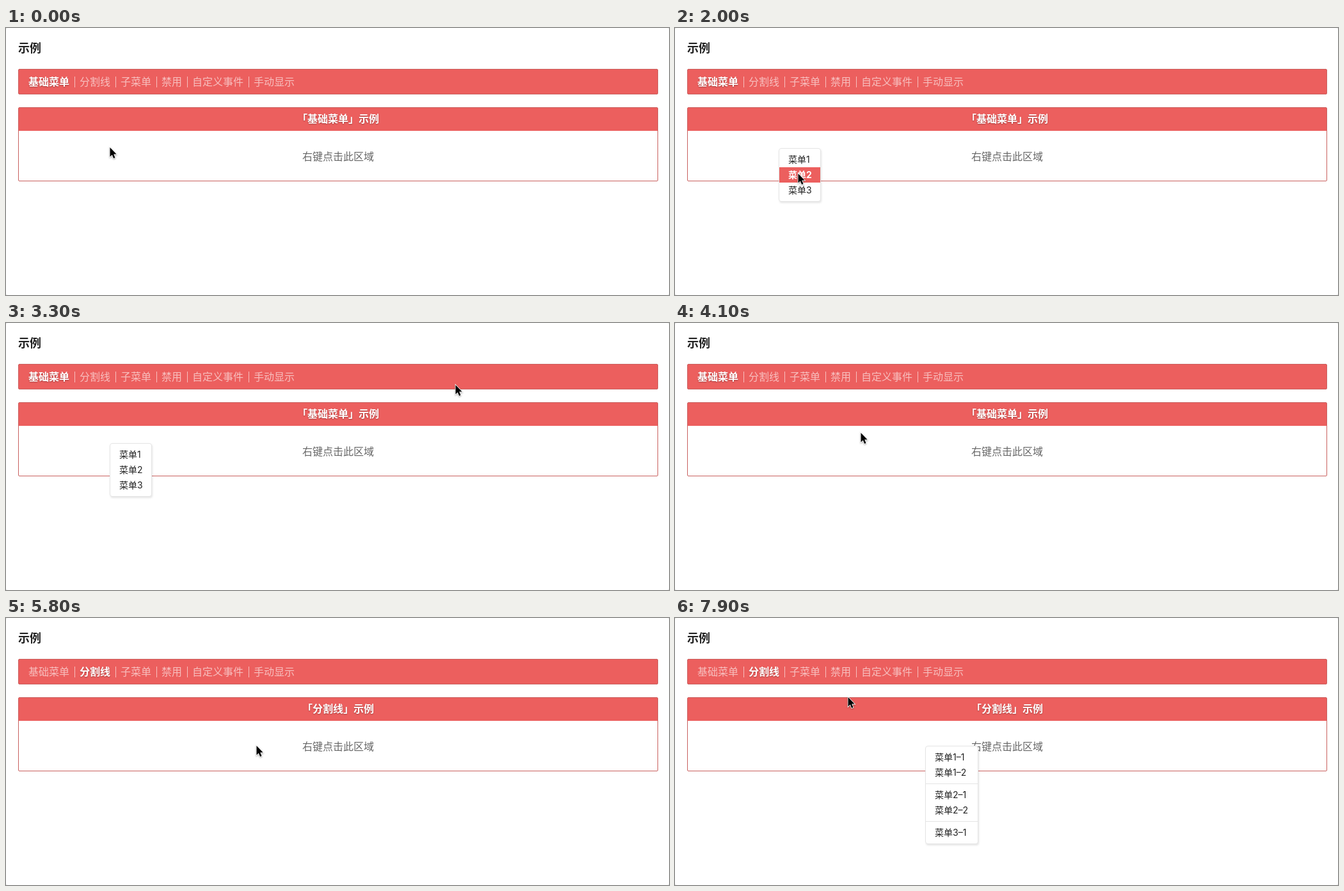
Animation of 1036 by 418 pixels, one loop 8 s. Source, as an HTML page:

```html
<!DOCTYPE html>
<html lang="zh-CN">
<head>
<meta charset="utf-8">
<title>右键菜单示例</title>
<style>
  :root { --red: #ec5f5e; --edge: #c9605f; --dim: rgba(255, 255, 255, .6); }
  * { box-sizing: border-box; }
  html, body { margin: 0; width: 100%; height: 100%; overflow: hidden; background: #e6e6e6; }
  body { font: 16px/24px Inter, "Noto Sans CJK SC", "Noto Sans CJK", sans-serif; color: #222; }
  #stage { position: absolute; left: 0; top: 0; width: 1036px; height: 418px; overflow: hidden; background: #fff; border-radius: 3px; }
  #stage div, #stage svg { position: absolute; white-space: nowrap; }

  #heading { left: 19px; top: 20px; font-size: 18px; font-weight: 700; }

  #nav, #panel { left: 19px; width: 1000px; border: 1px solid var(--edge); border-radius: 2px; }
  #nav { top: 64px; height: 40px; background: var(--red); }
  #nav span { position: absolute; top: 7px; color: var(--dim); }
  #nav span + span::before { content: ""; position: absolute; left: -8px; top: 4px; width: 1px; height: 17px; background: var(--dim); }

  #panel { top: 124px; height: 116px; }
  .title { left: 0; top: 0; width: 998px; height: 36px; line-height: 34px; background: var(--red); color: #fff; font-weight: 700; text-align: center; text-shadow: 0 1px 2px rgba(0, 0, 0, .3); }
  #area { left: 0; top: 64px; width: 998px; text-align: center; color: #666; }

  .menu { padding: 5px 0; border: 1px solid #e4e4e4; border-radius: 4px; background: #fff; font-size: 14px; box-shadow: 1px 2px 3px rgba(0, 0, 0, .1); }
  .menu p { margin: 0; height: 24px; padding-left: 14px; }
  .menu hr { margin: 5px 0; height: 1px; border: 0; background: #e4e4e4; }
  #basic { left: 162px; top: 188px; width: 66px; height: 84px; }
  #split { left: 391px; top: 200px; width: 83px; height: 154px; }

  #dialog { left: 269px; top: 0; width: 500px; height: 133px; background: #fff; color: #111; border-radius: 0 0 3px 3px; box-shadow: 0 1px 6px rgba(0, 0, 0, .55); }
  #host { left: 22px; top: 6px; font-size: 15px; }
  #says { left: 133px; top: 6px; }
  #message { left: 22px; top: 45px; font-size: 13px; }
  #ok { left: 408px; top: 85px; width: 72px; height: 27px; border: 1px solid #aaa; border-radius: 2px; background: linear-gradient(#f7f7f7, #dedede); font-size: 12px; line-height: 26px; text-align: center; }

  #cursor { left: 0; top: 0; overflow: visible; filter: drop-shadow(0 1px 1px rgba(0, 0, 0, .35)); }

  /* One 8 s clock for everything */
  .on { animation: 8s step-end infinite; }
  #tab1 { animation-name: tab-off; }
  #tab2 { animation-name: tab-on; }
  #title2 { animation-name: title2; }
  #basic { animation-name: basic; }
  #item1 { animation-name: item1; }
  #item2 { animation-name: item2; }
  #dialog { animation-name: dialog; }
  #split { animation-name: split; }
  #arrow { animation-name: arrow; }
  #hand { animation-name: hand; }
  #cursor { animation: move 8s infinite; }

  @keyframes tab-off {
    0% { color: #fff; font-weight: 700; text-shadow: 0 1px 2px rgba(0, 0, 0, .3); }
    60%, 100% { color: var(--dim); font-weight: 400; text-shadow: none; }
  }
  @keyframes tab-on {
    0% { color: var(--dim); font-weight: 400; text-shadow: none; }
    60%, 100% { color: #fff; font-weight: 700; text-shadow: 0 1px 2px rgba(0, 0, 0, .3); }
  }
  @keyframes title2 { 0% { opacity: 0; } 60%, 100% { opacity: 1; } }
  @keyframes basic { 0% { opacity: 0; } 5% { opacity: 1; } 48.75%, 100% { opacity: 0; } }
  @keyframes item1 {
    0%, 16.25%, 100% { background: #fff; color: #222; font-weight: 400; }
    11.25% { background: var(--red); color: #fff; font-weight: 700; }
  }
  @keyframes item2 {
    0%, 40%, 100% { background: #fff; color: #222; font-weight: 400; }
    16.25% { background: var(--red); color: #fff; font-weight: 700; }
  }
  @keyframes dialog { 0% { opacity: 0; } 27.5% { opacity: 1; } 40%, 100% { opacity: 0; } }
  @keyframes split { 0% { opacity: 0; } 76.25%, 100% { opacity: 1; } }
  @keyframes arrow { 0% { opacity: 1; } 58.75% { opacity: 0; } 65%, 100% { opacity: 1; } }
  @keyframes hand { 0% { opacity: 0; } 58.75% { opacity: 1; } 65%, 100% { opacity: 0; } }

  /* The pointer advances every 100 ms */
  @keyframes move {
    0% { transform: translate(162px, 187px); animation-timing-function: steps(7); }
    8.75% { transform: translate(162px, 187px); animation-timing-function: steps(3); }
    12.5% { transform: translate(176px, 202px); animation-timing-function: steps(3); }
    16.25% { transform: translate(188px, 222px); animation-timing-function: steps(3); }
    20% { transform: translate(192px, 235px); animation-timing-function: steps(4); }
    25%, 28.75% { transform: translate(192px, 228px); animation-timing-function: steps(4); }
    33.75% { transform: translate(670px, 108px); animation-timing-function: steps(2); }
    36.25%, 41.25% { transform: translate(702px, 97px); animation-timing-function: steps(4); }
    46.25% { transform: translate(420px, 180px); animation-timing-function: steps(4); }
    51.25%, 53.75% { transform: translate(290px, 172px); animation-timing-function: steps(4); }
    58.75%, 63.75% { transform: translate(148px, 83px); animation-timing-function: steps(3); }
    67.5% { transform: translate(350px, 190px); animation-timing-function: steps(4); }
    72.5%, 77.5% { transform: translate(391px, 200px); animation-timing-function: steps(4); }
    82.5% { transform: translate(372px, 251px); animation-timing-function: steps(2); }
    85% { transform: translate(362px, 276px); animation-timing-function: steps(3); }
    88.75% { transform: translate(340px, 318px); animation-timing-function: steps(2); }
    91.25%, 92.5% { transform: translate(318px, 284px); animation-timing-function: steps(5); }
    98.75%, 100% { transform: translate(270px, 124px); animation-timing-function: steps(1); }
  }
</style>
</head>
<body>
<div id="stage">
  <div id="heading">示例</div>

  <div id="nav">
    <span class="on" id="tab1" style="left:15px">基础菜单</span>
    <span class="on" id="tab2" style="left:95px">分割线</span>
    <span style="left:159px">子菜单</span>
    <span style="left:223px">禁用</span>
    <span style="left:271px">自定义事件</span>
    <span style="left:367px">手动显示</span>
  </div>

  <div id="panel">
    <div class="title">「基础菜单」示例</div>
    <div class="title on" id="title2">「分割线」示例</div>
    <div id="area">右键点击此区域</div>
  </div>

  <div class="menu on" id="basic">
    <p class="on" id="item1">菜单1</p>
    <p class="on" id="item2">菜单2</p>
    <p>菜单3</p>
  </div>

  <div class="menu on" id="split">
    <p>菜单1–1</p>
    <p>菜单1–2</p>
    <hr>
    <p>菜单2–1</p>
    <p>菜单2–2</p>
    <hr>
    <p>菜单3–1</p>
  </div>

  <div class="on" id="dialog">
    <div id="host">localhost:8080</div>
    <div id="says">显示：</div>
    <div id="message">「菜单2」被点击啦！</div>
    <div id="ok">确定</div>
  </div>

  <svg id="cursor" width="20" height="20">
    <path class="on" id="arrow" d="M.5 0V14.6L3.8 11.5 6.1 17 8.5 16 6.2 10.6H10.6Z" fill="#000" stroke="#fff" stroke-width="1.6" paint-order="stroke"/>
    <g class="on" id="hand" fill="#fff" stroke="#000" stroke-linejoin="round" stroke-linecap="round">
      <path d="M-1.6 1.3C-1.6-.6 1-.6 1.3 1.2L2 6C2.4 4.7 4.3 4.9 4.5 6.4 5 5.3 6.8 5.6 6.9 7 7.6 6.2 9 6.7 9 8.2V11C9 13 7.8 13.8 7.6 16.5H.6C.3 14.4-1.8 12.9-3.6 10.2-4.9 8.2-2.8 7.4-1.5 9L-.6 10Z"/>
      <path d="M1.6 10.5V13.5M3.9 10.5V13.5M6.1 10.5V13.5" stroke-width=".8"/>
    </g>
  </svg>
</div>
</body>
</html>
```
